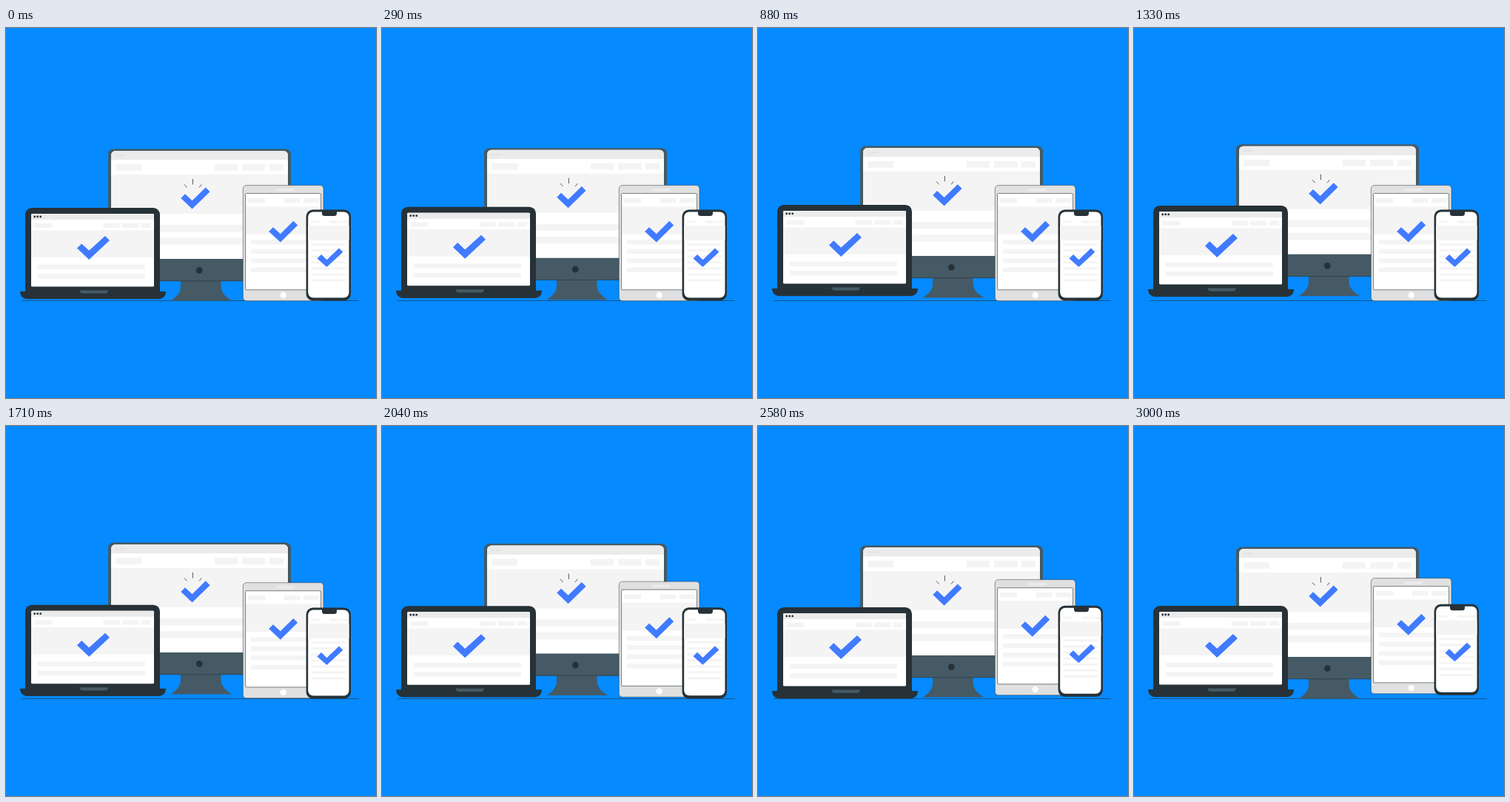
These frames come from a looping animation (500 px wide and 500 px high, 3.04 s). An HTML page with a canvas:

```html
<!DOCTYPE html>
<html lang="en">
<head>
<meta charset="utf-8">
<title>Responsive devices</title>
<style>
  html, body { margin: 0; width: 100%; height: 100%; overflow: hidden; background: #058aff; }
  canvas { display: block; width: 500px; height: 500px; }
</style>
</head>
<body>
<canvas id="stage"></canvas>
<script>
const canvas = document.getElementById('stage');
const ctx = canvas.getContext('2d');
const ratio = window.devicePixelRatio || 1;
canvas.width = canvas.height = Math.round(500 * ratio);

const LOOP = 3040, FRAME = 1000 / 24, LAST = 72;
const PERIOD = 3000, LIFT = 7;
const DARK = '#263238', SLATE = '#455a64', BLUE = '#407bff', WHITE = '#ffffff';
const PALE = '#f4f4f4', BAR = '#ebebeb', GREY = '#e0e0e0';

// Shapes are given by their edges: left, top, right, bottom.
function box(l, t, r, b, color, radius = 0) {
  ctx.fillStyle = color;
  ctx.beginPath();
  ctx.roundRect(l, t, r - l, b - t, radius);
  ctx.fill();
}

function outline(l, t, r, b, radius, width) {
  ctx.strokeStyle = DARK;
  ctx.lineWidth = width;
  ctx.beginPath();
  ctx.roundRect(l, t, r - l, b - t, radius);
  ctx.stroke();
}

function dot(x, y, r, color) {
  ctx.fillStyle = color;
  ctx.beginPath();
  ctx.arc(x, y, r, 0, Math.PI * 2);
  ctx.fill();
}

function shape(d, color) {
  ctx.fillStyle = color;
  ctx.fill(new Path2D(d));
}

function line(x1, y1, x2, y2, width) {
  ctx.strokeStyle = DARK;
  ctx.lineWidth = width;
  ctx.beginPath();
  ctx.moveTo(x1, y1);
  ctx.lineTo(x2, y2);
  ctx.stroke();
}

// Pairs of left and right edges sharing one row.
function row(t, b, spans, color = PALE) {
  for (const [l, r] of spans) box(l, t, r, b, color);
}

function lines(l, r, tops, height) {
  for (const t of tops) box(l, t, r, t + height, PALE);
}

function monitor() {
  box(138, 163.5, 385, 342, SLATE, [7, 7, 0, 0]);
  box(142, 166, 381, 312, WHITE, [6, 6, 0, 0]);
  box(142, 166, 381, 178.3, BAR, [6, 6, 0, 0]);
  for (const x of [150, 154.8, 159.6]) dot(x, 172.2, 1.5, GREY);
  row(184, 193, [[148.5, 183], [282, 313], [319, 350.3], [356, 375]]);
  box(142, 198, 381, 251, PALE);
  lines(149, 375, [266, 283.3], 9.3);
  line(252.4, 204, 252.4, 211.5, 0.8);
  line(241, 211.5, 244.5, 215.5, 0.8);
  line(264.3, 211.5, 261, 215.5, 0.8);
  shape('M236.3 230L242 224.2L251.6 233.2L269.8 215.4L275.6 221.2L251.6 244.6Z', BLUE);
  dot(261.3, 327.5, 4.4, DARK);
  shape('M236 341.5V351C235 360 229 363.5 223 368.5H305.5C298 364 291.5 359 290.5 350V341.5Z', SLATE);
  line(208, 341.8, 322, 341.8, 0.6);
}

function laptop() {
  box(26, 243, 208, 358, DARK, [9, 9, 0, 0]);
  box(34, 251, 200, 349.6, WHITE, 1.5);
  box(34, 251, 200, 259, BAR, [1.5, 1.5, 0, 0]);
  for (const x of [38.7, 42.7, 46.7]) dot(x, 255, 1.4, DARK);
  row(263.7, 270, [[38.5, 62.5], [131.5, 153.5], [157, 179], [182.5, 196]]);
  box(34, 273.3, 200, 310, PALE);
  lines(42.5, 188, [319.8, 332.2], 6.3);
  shape('M96 297.5L102.2 291.4L112.2 300.8L134 281L140 287L112.2 313Z', BLUE);
  shape('M19 356H216C216 362 212 366.3 206 366.3H29C23 366.3 19 362 19 356Z', DARK);
  shape('M99 354.6H138.4L136.6 357.5Q135.8 358.8 134 358.8H103.4Q101.6 358.8 100.8 357.5Z', SLATE);
}

function tablet() {
  box(320.3, 212.6, 429, 368.7, GREY, 4.5);
  outline(320.3, 212.6, 429, 368.7, 4.5, 0.5);
  box(323.6, 223.6, 425.6, 353.8, WHITE, 1);
  row(230, 236.3, [[326.8, 350.3], [376, 397.5], [402, 423]]);
  box(323.6, 241.3, 425.6, 279, PALE);
  lines(331, 418, [286.2, 298.7, 311.2, 323.7], 6.3);
  outline(323.6, 223.6, 425.6, 353.8, 1, 0.6);
  box(365, 217, 390, 220.6, BAR, 1.8);
  dot(374.7, 361, 4.2, WHITE);
  shape('M355.2 275L361 269.2L370.8 278.2L388.3 260.8L394.2 266.6L370.8 289.6Z', BLUE);
}

function phone() {
  box(405.6, 245.5, 466, 368.5, DARK, 9);
  box(408.2, 248.4, 463.5, 364.5, WHITE, 7);
  row(260.5, 263.5, [[411.5, 423], [437, 448], [450.5, 462]]);
  box(408.2, 267, 463.5, 287, PALE);
  lines(412.5, 459, [291, 299.1, 307.2, 315.3, 323.4, 331.5, 339.6], 3);
  box(427, 246.5, 447, 254, DARK, [0, 0, 3.5, 3.5]);
  shape('M420.5 311.5L426 306L433.5 313.2L450 297.4L455.4 302.8L433.5 323Z', BLUE);
}

// Linear rise and fall, at rest until its start.
function lift(t, start) {
  const p = Math.max(0, t - start) % PERIOD / PERIOD;
  return -LIFT * (1 - Math.abs(1 - 2 * p));
}

function place(draw, y) {
  ctx.save();
  ctx.translate(0, y);
  draw();
  ctx.restore();
}

function render(now) {
  const step = Math.min(LAST, Math.floor((now % LOOP + 5) / FRAME));
  const t = step * FRAME;
  ctx.setTransform(ratio, 0, 0, ratio, 0, 0);
  box(0, 0, 500, 500, '#058aff');
  line(21, 368.5, 477, 368.5, 0.6);
  place(monitor, lift(t, 0));
  place(laptop, lift(t, -500) - lift(0, -500));
  place(tablet, lift(t, 1520));
  place(phone, lift(t, 2000));
}

const start = performance.now();
function tick() {
  render(performance.now() - start);
  requestAnimationFrame(tick);
}
tick();
</script>
</body>
</html>
```
